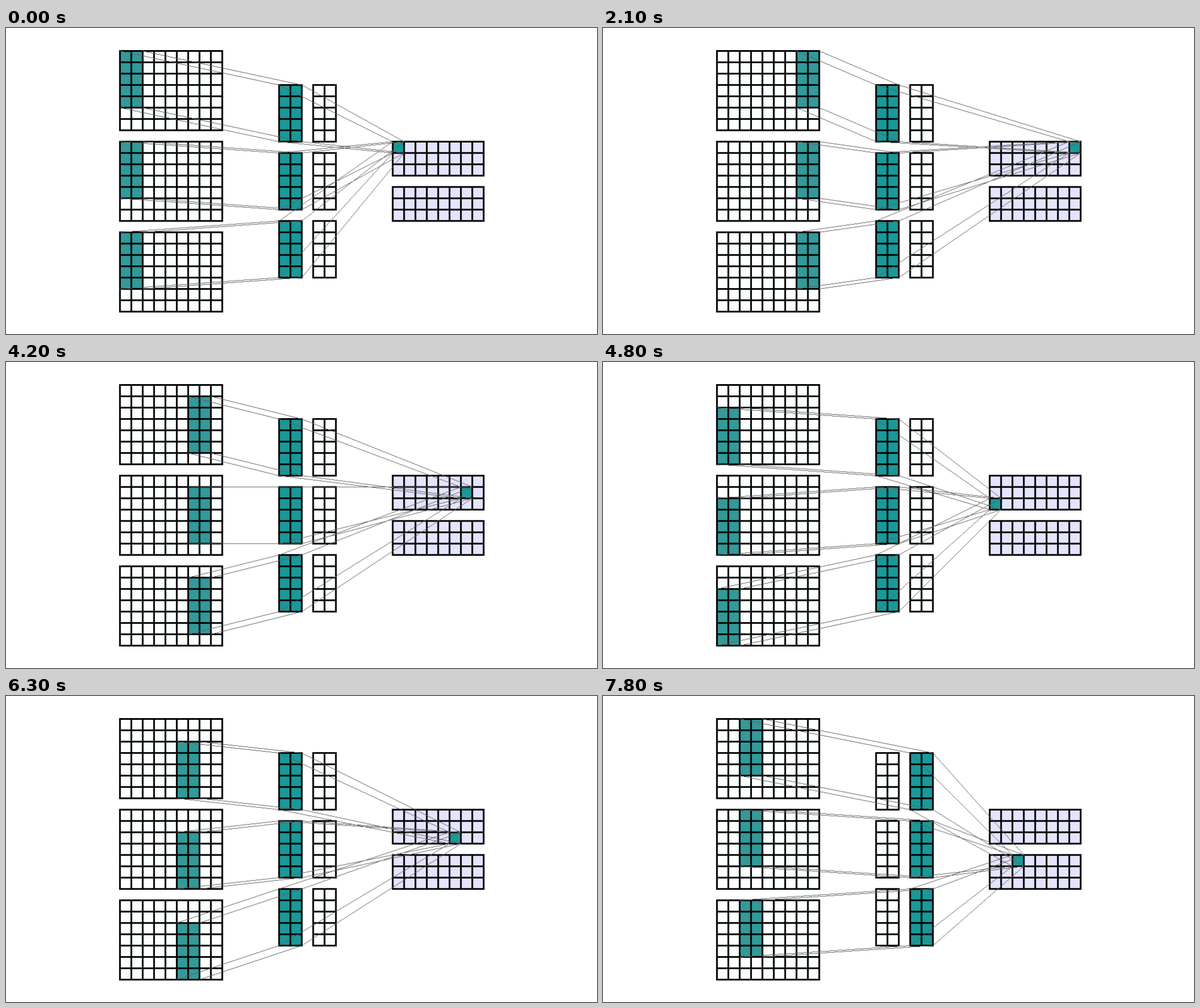
An HTML page with a canvas that plays this animation: 1039 by 539 pixels, repeating every 8 s.

```html
<!DOCTYPE html>
<html lang="en">
<head>
<meta charset="utf-8">
<title>Convolution</title>
<style>
html, body { margin: 0; width: 100%; height: 100%; overflow: hidden; background: #fff; }
canvas { display: block; }
</style>
</head>
<body>
<canvas id="stage" width="1039" height="539"></canvas>
<script>
const view = document.getElementById("stage").getContext("2d");
// The scene is drawn on a whole-pixel board, then fitted smoothly to the stage
const board = document.createElement("canvas");
board.width = 1040;
board.height = 540;
const ctx = board.getContext("2d");
const CELL = 20, STEP = 300, LOOP = 8000;
const OUT_COLS = 8, OUT_ROWS = 3, K_COLS = 2, K_ROWS = 5;
const PALE = "#fbfffe", LAVENDER = "#e4e4fd";
const PATCH = "#339999", ACTIVE = "#199999", RAY = "#606060";

function cells(x, y, cols, rows, color) {
  ctx.fillStyle = color;
  ctx.fillRect(x, y, cols * CELL, rows * CELL);
}

function grid(x, y, cols, rows) {
  const w = cols * CELL, h = rows * CELL;
  ctx.fillStyle = "#000";
  for (let c = 0; c <= cols; c++) ctx.fillRect(x + c * CELL - 1, y - 1, 3, h + 3);
  for (let r = 0; r <= rows; r++) ctx.fillRect(x - 1, y + r * CELL - 1, w + 3, 3);
}

// One-pixel line without smoothing
function ray([x0, y0], [x1, y1]) {
  const n = Math.max(Math.abs(x1 - x0), Math.abs(y1 - y0));
  for (let i = 0; i <= n; i++) {
    ctx.fillRect(Math.round(x0 + (x1 - x0) * i / n), Math.round(y0 + (y1 - y0) * i / n), 1, 1);
  }
}

function corners(x, y, cols, rows) {
  const r = x + cols * CELL, b = y + rows * CELL;
  return [[x, y], [r, y], [x, b], [r, b]];
}

function draw(step) {
  const perFilter = OUT_COLS * OUT_ROWS;
  const filter = Math.floor(step / perFilter);
  const col = step % OUT_COLS;
  const row = Math.floor(step % perFilter / OUT_COLS);
  const outX = 680 + col * CELL, outY = 200 + filter * 80 + row * CELL;
  const patchX = 200 + col * CELL, kernelX = 480 + filter * 60;

  ctx.fillStyle = "#fff";
  ctx.fillRect(0, 0, board.width, board.height);

  for (let ch = 0; ch < 3; ch++) {
    const y = 40 + ch * 160, ky = 100 + ch * 120;
    cells(200, y, 9, 7, PALE);
    cells(patchX, y + row * CELL, K_COLS, K_ROWS, PATCH);
    grid(200, y, 9, 7);
    for (let f = 0; f < 2; f++) {
      const kx = 480 + f * 60;
      cells(kx, ky, K_COLS, K_ROWS, f === filter ? ACTIVE : PALE);
      grid(kx, ky, K_COLS, K_ROWS);
    }
  }
  for (let f = 0; f < 2; f++) {
    const y = 200 + f * 80;
    cells(680, y, OUT_COLS, OUT_ROWS, LAVENDER);
    if (f === filter) cells(outX, outY, 1, 1, ACTIVE);
    grid(680, y, OUT_COLS, OUT_ROWS);
  }

  ctx.fillStyle = RAY;
  const target = corners(outX, outY, 1, 1);
  for (let ch = 0; ch < 3; ch++) {
    const from = corners(patchX, 40 + ch * 160 + row * CELL, K_COLS, K_ROWS);
    const mid = corners(kernelX, 100 + ch * 120, K_COLS, K_ROWS);
    mid.forEach((p, i) => {
      ray(from[i], p);
      ray(p, target[i]);
    });
  }

  view.imageSmoothingEnabled = true;
  view.drawImage(board, 0, 0, view.canvas.width, view.canvas.height);
}

let shown = -1;
function tick(now) {
  const step = Math.floor(now % LOOP / STEP);
  if (step !== shown) draw(shown = step);
  requestAnimationFrame(tick);
}
tick(performance.now());
</script>
</body>
</html>
```
